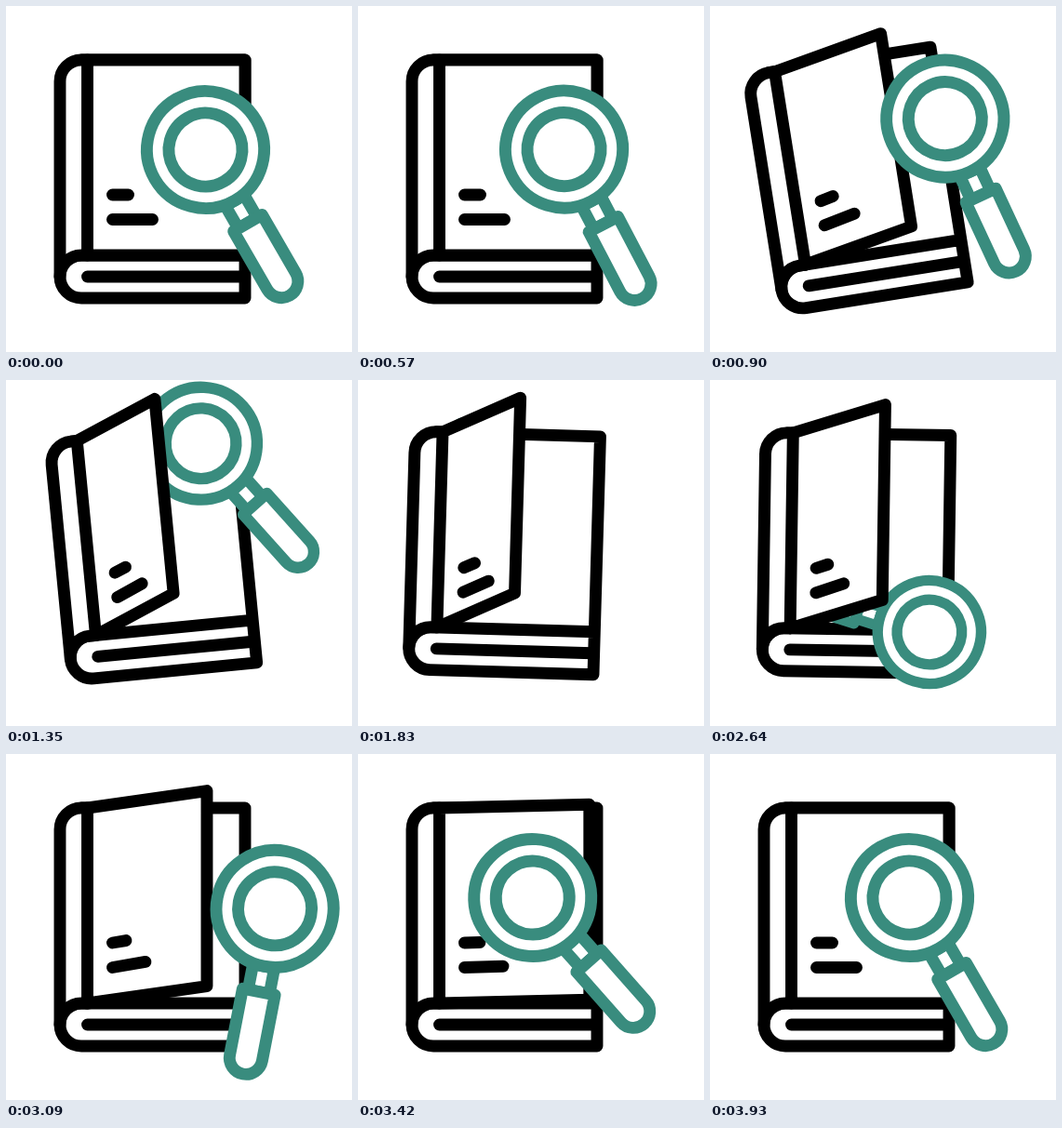
Write an HTML page with a canvas that moves like this. It is 372 px wide and 372 px high and loops after 5400 ms.

```html
<!DOCTYPE html>
<html lang="en">
<head>
<meta charset="utf-8">
<title>Book search</title>
<style>
  html, body { margin: 0; width: 100%; height: 100%; overflow: hidden; background: #fff; }
  canvas { display: block; width: 372px; height: 372px; }
</style>
</head>
<body>
<canvas id="stage" width="372" height="372"></canvas>
<script>
const ctx = document.getElementById('stage').getContext('2d');
const LOOP = 5400, STEP = 30, PI = Math.PI, RAD = PI / 180;
const INK = '#000', TEAL = '#398c7e';

const progress = (t, from, to) => Math.min(1, Math.max(0, (t - from) / (to - from)));

// Swings with cosine easing through turning points [time, value].
function swing(t, ...turns) {
  let value = turns[0][1];
  for (let i = 1; i < turns.length; i++) {
    const u = progress(t, turns[i - 1][0], turns[i][0]);
    value += (turns[i][1] - turns[i - 1][1]) * (1 - Math.cos(PI * u)) / 2;
  }
  return value;
}

const tiltAt = t => swing(t, [640, 0], [1110, -15.5], [1515, 0], [2140, 3.3], [2900, 0]);

// The cover flies open, slowing down, and falls shut, speeding up.
const openAt = t => 87 * (1 - (1 - progress(t, 600, 1900)) ** 3.3 - progress(t, 1900, 3490) ** 2.2);

const lensAt = t => ({
  x: swing(t, [420, 214.5], [960, 254], [2000, 110], [3030, 293.5], [3510, 178], [3930, 214.5]),
  y: swing(t, [530, 154.5], [1400, 67.5], [2190, 271], [2640, 271], [3207, 154.5]),
  angle: swing(t, [120, 30], [1170, 24], [2080, 215], [2250, 215], [3600, 410], [3930, 390]),
  scale: 1 - 0.28 * Math.sin(PI * progress(t, 1100, 3090)) ** 2
});

function paint(build, fill) {
  ctx.beginPath();
  build();
  if (fill) {
    ctx.fillStyle = '#fff';
    ctx.fill();
  }
  ctx.stroke();
}

const line = (x1, y1, x2, y2) => paint(() => {
  ctx.moveTo(x1, y1);
  ctx.lineTo(x2, y2);
});

const disc = r => paint(() => ctx.arc(0, 0, r, 0, PI * 2), true);

function inBook(tilt, draw) {
  ctx.save();
  ctx.translate(159, 178);
  ctx.rotate(tilt * RAD);
  ctx.translate(-159, -178);
  ctx.strokeStyle = INK;
  draw();
  ctx.restore();
}

function drawBack() {
  paint(() => {
    ctx.moveTo(81, 58);
    ctx.lineTo(257, 58);
    ctx.lineTo(257, 314);
    ctx.lineTo(81, 314);
    ctx.arc(81, 291, 23, PI / 2, PI * 1.5);
    ctx.lineTo(257, 268);
  }, true);
  line(87.5, 291, 255, 291);
}

function drawFront(open) {
  const lift = open * 0.45;
  paint(() => {
    ctx.moveTo(87.5, 58);
    ctx.lineTo(81, 58);
    ctx.arc(81, 81, 23, PI * 1.5, PI, true);
    ctx.lineTo(58, 291);
    ctx.arc(81, 291, 23, PI, PI * 1.5);
    ctx.lineTo(87.5, 268);
  }, true);
  paint(() => {
    ctx.moveTo(87.5, 58);
    ctx.lineTo(257 - open, 58 - lift);
    ctx.lineTo(257 - open, 268 - lift);
    ctx.lineTo(87.5, 268);
    ctx.closePath();
  }, true);
  line(114.5, 203, 131.5 - open * 0.062, 203 - open * 0.06);
  line(114.5, 229.5, 157.5 - open * 0.185, 229.5 - open * 0.148);
}

function drawLens({ x, y, angle, scale }) {
  ctx.save();
  ctx.translate(x, y);
  ctx.rotate(-angle * RAD);
  ctx.scale(scale, scale);
  ctx.strokeStyle = TEAL;
  paint(() => ctx.rect(-11.7, 63, 23.4, 28), true);
  paint(() => {
    ctx.moveTo(-17.7, 91);
    ctx.lineTo(17.7, 91);
    ctx.arc(0, 163.3, 17.7, 0, PI);
    ctx.closePath();
  }, true);
  disc(63);
  disc(39.5);
  ctx.restore();
}

function frame(now) {
  const t = Math.floor(now % LOOP / STEP) * STEP;
  const tilt = tiltAt(t), open = openAt(t), lens = lensAt(t);
  const inside = t > 1100 && t < 3000;
  ctx.fillStyle = '#fff';
  ctx.fillRect(0, 0, 372, 372);
  ctx.lineWidth = 12.9;
  ctx.lineCap = ctx.lineJoin = 'round';
  inBook(tilt, drawBack);
  if (inside) drawLens(lens);
  inBook(tilt, () => drawFront(open));
  if (!inside) drawLens(lens);
}

const start = performance.now();
function tick() {
  frame(performance.now() - start);
  requestAnimationFrame(tick);
}
tick();
</script>
</body>
</html>
```
